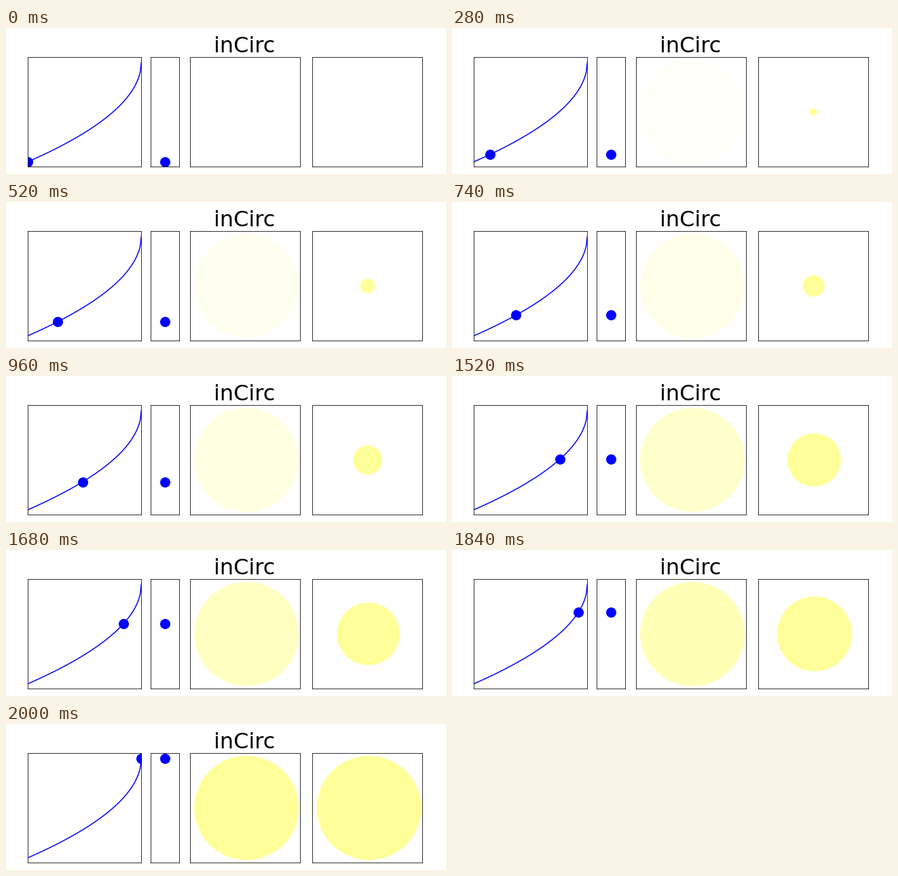
A matplotlib script that plays this animation: 648x216 px, repeating every 2.02 s.

```python
import numpy as np
import matplotlib.pyplot as plt
from matplotlib.animation import FuncAnimation
from matplotlib.patches import Circle

FRAMES, INTERVAL = 101, 20
HALF = 81
YELLOW = "#ffff99"
EMBLEM_POS = np.array([2.5, 0.0])
EMBLEM_RADIUS = 77


def ease(t):
    return 1 - np.sqrt(1 - t)


def add_emblem(ax):
    ax.set(xlim=(-HALF, HALF), ylim=(-HALF, HALF), aspect="equal")
    disc = Circle(EMBLEM_POS, EMBLEM_RADIUS, color=YELLOW, lw=0)
    return ax.add_patch(disc)


def add_dot(ax):
    dot, = ax.plot([0], [0], "o", color="blue", ms=14)
    return dot


plt.rcParams["font.family"] = "DejaVu Sans"
fig, axes = plt.subplots(
    1, 4, figsize=(9, 3), dpi=72, facecolor="white",
    gridspec_kw=dict(width_ratios=[4, 1, 4, 4], wspace=0.1,
                     left=0.05, right=0.95, bottom=0.05, top=0.8))
curve_ax, track_ax, fade_ax, zoom_ax = axes
for ax in axes:
    ax.set(xticks=[], yticks=[])

curve_ax.set(xlim=(0, 1), ylim=(-0.05, 1.05))
track_ax.set(xlim=(-1, 1), ylim=(-0.05, 1.05))
fade_ax.set_title("inCirc", fontsize=32)

ts = np.linspace(0, 1, FRAMES)
curve_ax.plot(ts, ease(ts), color="blue", lw=1.5)
curve_dot = add_dot(curve_ax)
track_dot = add_dot(track_ax)
fading = add_emblem(fade_ax)
zooming = add_emblem(zoom_ax)


def update(i):
    t = ts[i]
    e = ease(t)
    curve_dot.set_data([t], [e])
    track_dot.set_data([0], [e])
    fading.set_alpha(e)
    zooming.set_center(EMBLEM_POS * e)
    zooming.set_radius(EMBLEM_RADIUS * e)
    zooming.set_visible(e > 0)
    return curve_dot, track_dot, fading, zooming


anim = FuncAnimation(fig, update, frames=FRAMES, interval=INTERVAL,
                     repeat=True, repeat_delay=0, blit=False)
plt.show()
```
